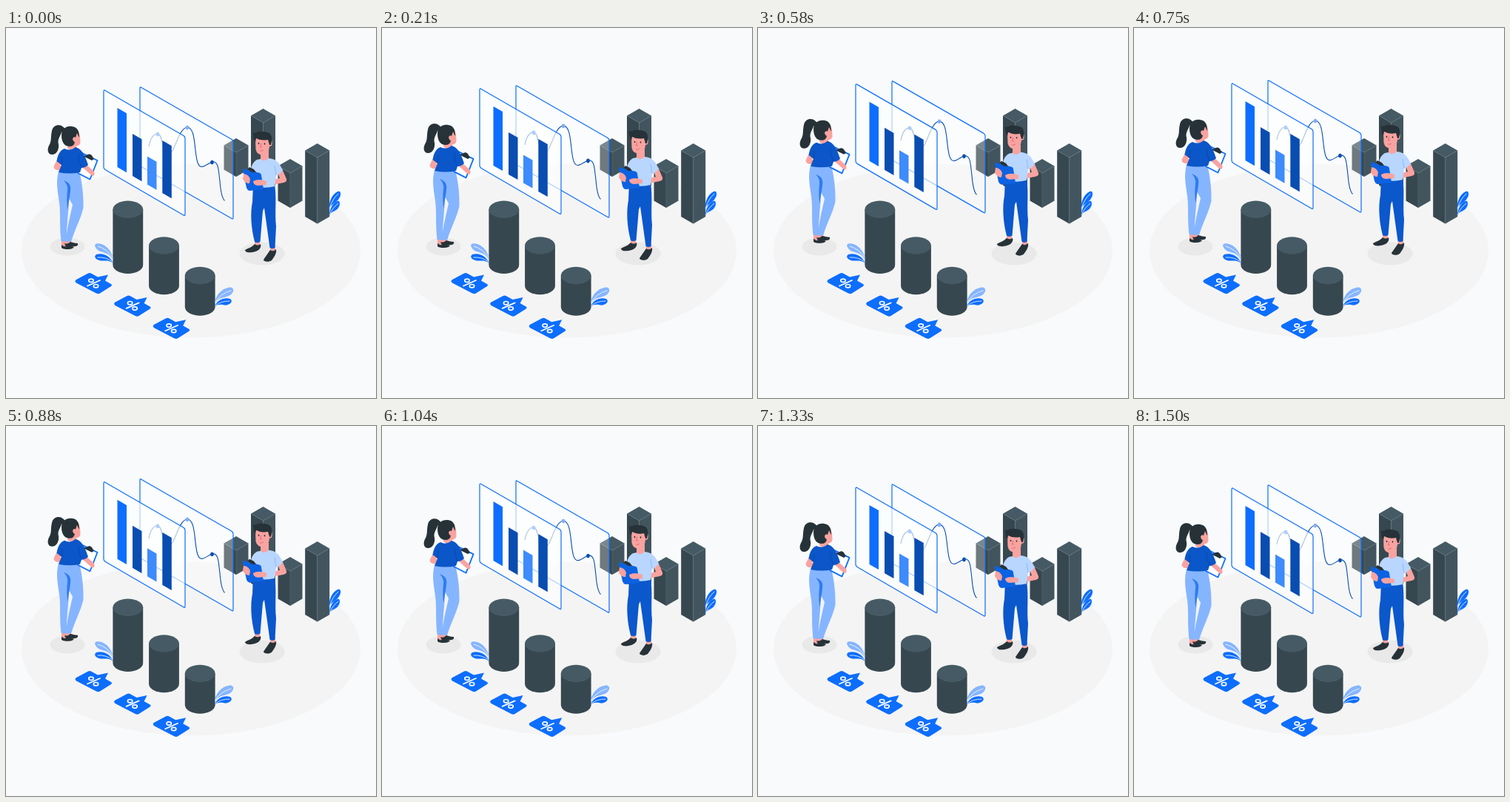
These frames come from a looping animation (500x500 px, 1540 ms). An HTML page:

```html
<!DOCTYPE html>
<html lang="en">
<head>
<meta charset="utf-8">
<title>Isometric data analysis</title>
<style>
  html, body { margin: 0; height: 100%; overflow: hidden; background: #f8fafc; }
  svg { display: block; width: 100vw; height: 100vh; }
  .dark { fill: #263238; }
  .skin { fill: #f9a3a0; }
  .blue { fill: #0d6efd; }
  .navy { fill: #094db1; }
  .pale { fill: #86b5ff; }
  .line { fill: none; stroke: #0d6efd; stroke-width: 1.2; stroke-linejoin: round; }
  .vein { fill: none; stroke: #fff; stroke-width: .8; stroke-linecap: round; }
</style>
</head>
<body>
<svg viewBox="0 0 500 500">
  <ellipse cx="250" cy="301" rx="229" ry="117.5" fill="#f4f4f4"/>
  <g fill="#e9e9e9">
    <ellipse cx="83" cy="295.5" rx="23.5" ry="12"/>
    <ellipse cx="346" cy="305" rx="30.5" ry="15.5"/>
  </g>
  <g id="prisms"></g>
  <g class="blue">
    <path d="M436.500 246C436 234 442 222 450 220.500C454 222 452 229 448 233C443 238 439 238 436.500 246"/>
    <path d="M436.500 255C437 245 442 235 449 233.500C453 235 451 243 446 246C442 249 439 248 436.500 255"/>
  </g>
  <path class="vein" d="M437.500 243Q441 231 449 224M437.500 252Q441 243 449 237"/>

  <g id="floating">
    <!-- line chart panel -->
    <path d="M181 82V186L307 258V152Z" fill="#fff" opacity=".28"/>
    <path class="line" d="M181 184V81Q181 79 183 80.5L305 150.5Q307 152 307 154V256Q307 259 305 257.5L183 187.5Q181 186 181 184Z"/>
    <path d="M193 160C195 150 199 143 205 143C211 144 211 160 214 166C217 173 222 171 226 164C231 154 236 135 245 134C257 135 254 168 259 182C263 193 270 185 278 181C288 179 287 194 289 207C290 220 292 230 295.500 233.500" fill="none" stroke="#094db1" stroke-width="1.1"/>
    <ellipse class="blue" cx="205" cy="143.500" rx="2.300" ry="2.800"/>
    <ellipse cx="245" cy="134.500" rx="2.300" ry="2.800" fill="#82adf8"/>
    <ellipse class="navy" cx="278.500" cy="181.500" rx="2.300" ry="2.800"/>

    <!-- bar chart panel -->
    <path d="M132 84V190L242 253.500V147Z" fill="#fff" opacity=".66"/>
    <path class="line" d="M132 188V85.5Q132 83 134 84.5L240 145.5Q242 147 242 149V251.5Q242 254.5 240 253L134 191.5Q132 190 132 188Z"/>
    <g id="bars"></g>

    <!-- woman -->
    <path class="skin" d="M75 286H81L81 295H75ZM81 284H88L87 293H81Z"/>
    <path class="dark" d="M79 291Q83 293 87 289Q93 291 97 291Q98 294 94 295L81 296ZM75 293Q80 297 84 294L92 296Q90 299 84 299Q77 299 75 297Z"/>
    <path class="pale" d="M71 194H99C103 209 105 227 104.500 243C101 258 93 272 88 289L81 288C82 272 86 257 90 239L85 230C85 245 82 265 81.500 289L74.500 288C72 267 74 250 72 236C70 222 67 208 71 194Z"/>
    <path d="M78 206C87 209 88 214 87 221C86 230 84 238 83.500 246C82 238 82 229 83 219Q84 212 78 206" fill="#2f7cf0"/>
    <path class="line" d="M103 169L123.500 179L113.500 204.500L97 196Z" style="fill:#fff;stroke-width:1.8"/>
    <path class="dark" d="M106 172Q109 173 110 171Q115 169 117 174L119 177L116 179L106 174Z"/>
    <path class="skin" d="M70 176L64.500 187Q64.500 191 69 192L78 193L78 187L73 186L77 180ZM107 183L119 194Q121 199 117 200L112 196L102 187ZM83 152H95V164Q89 168 83 162Z"/>
    <path fill="#0b56c8" d="M79 163Q87 167 94 161C101 163 106 169 111 185Q107 189 102 189L100 195Q86 198 71 195L75 185L68.500 180C70 171 73 165 79 163Z"/>
    <path d="M98 171Q97 180 102 188M76 174L75 185" fill="none" stroke="#083f9a" stroke-width=".6"/>
    <path class="skin" d="M89 145L98 139Q101 147 100.500 155Q99 161 90 159Z"/>
    <path class="dark" d="M80 137C76 129 64 129 62 139C60 148 62 153 58 159C55 165 57 171 62 171C69 171 72 163 71 157C69 151 73 147 75 141Z"/>
    <path class="dark" d="M75 145C75 136 82 132 89 133C96 134 99 138 99 148Q97 145 96 142L94 148Q91 146 90 150Q91 154 93 154Q92 160 86 160C79 160 75 154 75 145Z"/>

    <!-- man -->
    <path class="skin" d="M336 286H343V295H336ZM357 293H364V303H357Z"/>
    <path class="dark" d="M323 300C328 297 333 296 336 292Q340 295 344 292C346 298 340 302 333 303C328 304 323 303 323 300ZM348 313C351 309 354 304 357 300Q361 303 365 299C366 305 362 310 359 314C355 317 348 316 348 313Z"/>
    <path fill="#0b57cc" d="M334 211H363C366 230 363 250 365 268L363.500 297Q360 299 356.500 297L349 243L347 247L343.500 289Q339 291 336 289C331 270 330 250 333 235Z"/>
    <path class="skin" d="M344 166H355V181Q349 184 344 179ZM366 193L373 190L379 204Q380 208 375 209L350 214L347 208L370 203Z"/>
    <path fill="#b9d6ff" d="M339 178L344 177Q349 182 355 176C364 177 368 180 374 192Q371 197 365 199L363 214Q348 218 334 213L331 191Q332 182 339 178Z"/>
    <path d="M363 186L365 199" fill="none" stroke="#7faef5" stroke-width=".7"/>
    <path fill="#0c62e2" d="M320 190L343 196Q345 197 345 199L348 218L329 220Q326 219 325 216L320 192Z"/>
    <path class="dark" d="M326 191L329 188L335 191L338 195L333 195Z"/>
    <path class="skin" d="M321 197Q328 198 330 204L329 210Q323 210 320 204ZM334 207Q341 203 352 207V212L340 213Q334 212 334 207Z"/>
    <path class="skin" d="M337 149H357Q361 152 359 159L356 160Q355 170 349 172Q339 172 337.500 164Z"/>
    <path class="dark" d="M335 151L333.500 141.500Q338 142.500 341 140Q351 139 357 143Q361 148 358 158L356 158L354 151Q345 153 338 149L337 154Z"/>
    <g class="dark">
      <ellipse cx="341.500" cy="156" rx=".8" ry="1.200"/>
      <ellipse cx="349.500" cy="156.500" rx=".8" ry="1.200"/>
    </g>
    <path d="M345 156L343.500 161H346M343 166Q346 167 348 165" fill="none" stroke="#d95f66" stroke-width=".8"/>
  </g>

  <g id="cylinders"></g>
  <path class="pale" d="M145 314C144 301 133 290 122 291.500C118 293 121 298 126 301.500C133 304 140 304 145 314M282 373C283 360 293 350.500 304 350.500C309 352 308 357 303 361C296 365 287 363 282 373"/>
  <path class="blue" d="M145 318.500C142 309 132 303 122 306C118 309 121 313 128 314.500C134 315 140 313 145 318.500M282 376.500C285 368 294 363.500 303 366C307 369 304 373 298 374.500C291 374 287 372 282 376.500"/>
  <path class="vein" d="M144 310Q136 298 124 295M144 316Q135 309 124 310M283 370Q290 359 304 355M283 375Q290 369 302 369"/>
  <g id="tags"></g>
</svg>
<script>
  const byId = id => document.getElementById(id);
  const fill = (id, items, draw) => byId(id).innerHTML = items.map(draw).join('');

  // Prism: centre x, top corner y, bottom corner y
  fill('prisms', [[311, 149, 201], [347.5, 109, 222], [384, 177, 243], [420.7, 156, 264.5]], ([x, top, bottom]) => `
    <path fill="#37474f" d="M${x - 16.5} ${top + 9.5}L${x} ${top + 19}V${bottom}L${x - 16.5} ${bottom - 9.5}Z"/>
    <path fill="#42555e" d="M${x + 16.5} ${top + 9.5}L${x} ${top + 19}V${bottom}L${x + 16.5} ${bottom - 9.5}Z"/>
    <path fill="#455a64" d="M${x} ${top}l16.5 9.5-16.5 9.5-16.5-9.5Z"/>
    <path fill="none" stroke="#62737b" stroke-width=".5" d="M${x - 16.5} ${top + 9.5}l16.5 9.5 16.5-9.5M${x} ${top + 19}V${bottom}"/>`);

  // Chart bar: left x, top y, height, colour
  fill('bars', [[150.5, 108, 80, '#0d6efd'], [171, 143, 57, '#094db1'], [191, 173.5, 38, '#3d8bfd'], [211.3, 152, 71, '#094db1']],
    ([x, y, h, color]) => `<path fill="${color}" d="M${x} ${y}l12.5 7.2v${h}l-12.5-7.2Z"/>`);

  // Cylinder: centre x, top centre y, height
  fill('cylinders', [[164.8, 245.3, 75], [213.5, 294, 54.5], [262.2, 334.5, 42.5]], ([x, y, h]) => `
    <path fill="#37474f" d="M${x - 20.4} ${y}v${h}a20.4 11.7 0 0 0 40.8 0v${-h}Z"/>
    <ellipse cx="${x}" cy="${y}" rx="20.4" ry="11.7" fill="#455a64"/>`);

  fill('tags', [0, 1, 2], i => `
    <g transform="translate(${i * 52.6} ${i * 30.4})">
      <path class="blue" d="M95 340L111 331.5Q113 330.5 115 331.5L124 336.5L138 333.5L134 341.5L142 346Q144 347.5 142 349L127 358.5Q125 360 122 358.5L95 344.5Q92 342 95 340Z"/>
      <g fill="none" stroke="#fff" stroke-width="1.7" stroke-linecap="round">
        <path d="M127 341L110 348.5"/>
        <ellipse cx="115" cy="341.3" rx="3.2" ry="2.2"/>
        <ellipse cx="121.5" cy="348.7" rx="3.2" ry="2.2"/>
      </g>
    </g>`);

  const LOOP = 1540, LEAD = 35, LIFT = 9;
  const floating = byId('floating');

  function frame() {
    const phase = 2 * Math.PI * (performance.now() + LEAD) / LOOP;
    floating.setAttribute('transform', `translate(0 ${-LIFT / 2 * (1 - Math.cos(phase))})`);
    requestAnimationFrame(frame);
  }
  frame();
</script>
</body>
</html>
```
